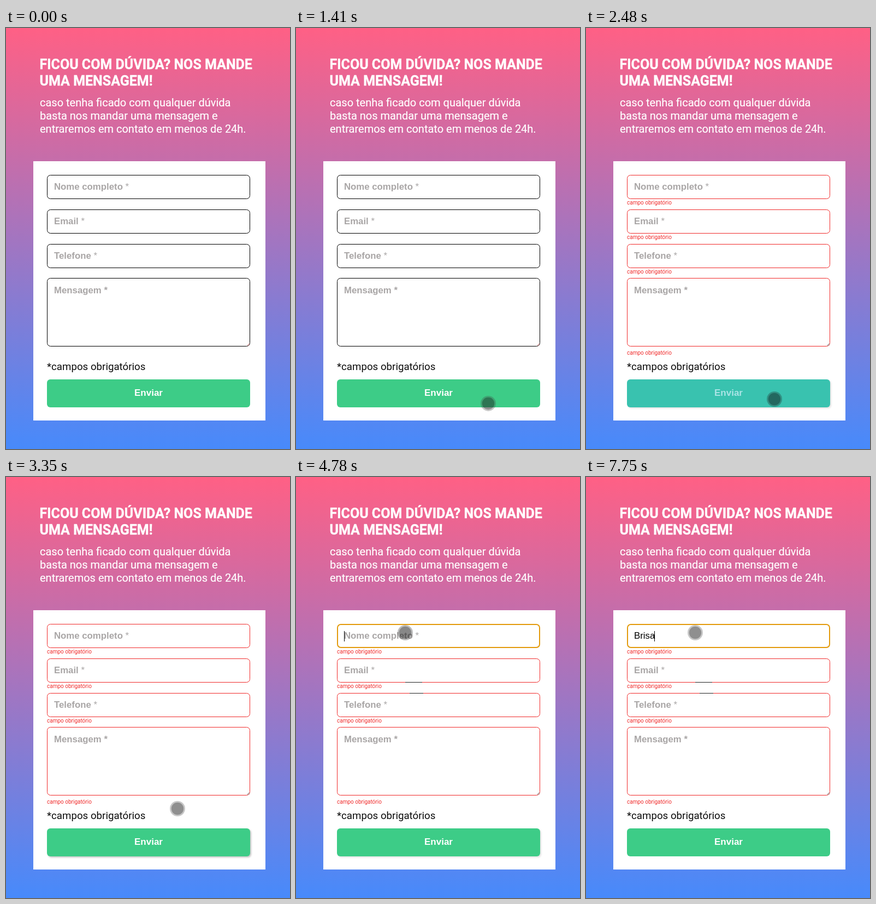
Recreate the animation shown at these times as an HTML page. Size 520 by 768 pixels, loop 8000 ms.

```html
<!DOCTYPE html>
<html lang="pt-BR">
<head>
<meta charset="utf-8">
<title>Formulário de contato</title>
<style>
  html, body { margin: 0; width: 100%; height: 100%; overflow: hidden; }
  svg { display: block; width: 520px; height: 768px; }
  text { white-space: pre; }
  .title { font: 700 25px Roboto, sans-serif; fill: #fff; stroke: #fff; stroke-width: .4; }
  .intro { font: 20px Roboto, sans-serif; fill: #fff; stroke: #fff; stroke-width: .2; }
  .note { font: 18.72px Roboto, sans-serif; fill: #0c0c0c; }
  .error { font: 10px Roboto, sans-serif; fill: #f02a2a; }
  .hint { font: 700 16.8px "Liberation Sans", Arial, sans-serif; fill: #a9a6a6; }
  .send { font: 700 17px "Liberation Sans", Arial, sans-serif; text-anchor: middle; }
  .typed { font: 16.8px "Liberation Sans", Arial, sans-serif; }
  .light { font-weight: 400; }
  .field { fill: none; stroke: #000; }
</style>
</head>
<body>
<svg viewBox="0 0 520 768">
  <defs>
    <linearGradient id="sky" x2="0" y2="1">
      <stop stop-color="#ff6085"/><stop offset="1" stop-color="#478afb"/>
    </linearGradient>
  </defs>
  <rect width="520" height="768" fill="url(#sky)"/>
  <text class="title" x="61.5" y="75">FICOU COM DÚVIDA? NOS MANDE</text>
  <text class="title" x="61.5" y="105">UMA MENSAGEM!</text>
  <text class="intro" x="62" y="143">caso tenha ficado com qualquer dúvida</text>
  <text class="intro" x="62" y="167">basta nos mandar uma mensagem e</text>
  <text class="intro" x="62" y="191">entraremos em contato em menos de 24h.</text>
  <rect x="50" y="243" width="425" height="473" fill="#fff"/>
  <g id="fields"></g>
  <path id="grip" d="M441.5 579.5l4-4M444 579.5l1.5-1.5" fill="none"/>
  <path id="marks" d="M200 374.5h31M208 394.5h25" stroke="#222"/>
  <text class="note" x="75" y="624">*campos obrigatórios</text>
  <rect id="button" x="75" y="641" width="372" height="51" rx="6"/>
  <text id="send" class="send" x="261" y="671">Enviar</text>
  <text id="typed" class="typed" x="88" y="295"></text>
  <rect id="caret" y="281" width="1" height="19"/>
  <g id="pointer">
    <circle id="ring" r="14"/>
    <circle r="11.2" fill="#000" fill-opacity=".28"/>
  </g>
  <path id="move" transform="translate(199 283)" stroke="#fff" stroke-width="1.6" paint-order="stroke"
    d="M0-9.5 4-5H1.3V-1.3H5V-4L9.5 0 5 4V1.3H1.3V5H4L0 9.5-4 5h2.7V1.3H-5V4L-9.5 0-5-4v2.7h3.7V-5H-4z"/>
</svg>
<script>
const $ = id => document.getElementById(id);
const LOOP = 8000, CLICK = 2410, FOCUS = 4780;
const NAME = 'Brisa', KEY_TIMES = [6300, 6500, 7160, 7490, 7750];
const CARET_X = [88, 98, 104, 108, 116, 125];

const fieldMarkup = ([label, star, top, height, textY, errorY]) => `
  <rect class="field" x="75.5" y="${top + .5}" width="371" height="${height - 1}" rx="6"/>
  <text class="hint" x="88" y="${textY}">${label} <tspan class="${star}">*</tspan></text>
  <text class="error" x="75" y="${errorY}">campo obrigatório</text>`;
$('fields').innerHTML = [
  ['Nome completo', 'light', 268, 44, 295, 322],
  ['Email', 'light', 331, 44, 358, 385],
  ['Telefone', 'light', 394, 44, 421, 448],
  ['Mensagem', '', 456, 125, 484, 596],
].map(fieldMarkup).join('');
const borders = [...document.querySelectorAll('.field')];
const errors = [...document.querySelectorAll('.error')];
const nameHint = document.querySelector('.hint');

const clamp = v => Math.max(0, Math.min(1, v));
const mix = (a, b, k) => a + (b - a) * k;
const mixColor = (a, b, k) => `rgb(${a.map((v, i) => Math.round(mix(v, b[i], k)))})`;
const within = (t, a, b) => t >= a && t < b;
const show = (node, on) => node.setAttribute('visibility', on ? 'visible' : 'hidden');
const set = (node, attrs) => Object.entries(attrs).forEach(([k, v]) => node.setAttribute(k, v));
// Progress from start to end in equal discrete steps.
const stepped = (t, start, end, steps) =>
  clamp(Math.floor((t - start) / (end - start) * steps + .1) / steps);

function pointerAt(t) {
  if (t < 3350) {
    const left = (1 - stepped(t, 860, 1610, 11)) ** 1.87;
    return [345 + 80 * left, 677 + 90 * left];
  }
  const left = 1 - stepped(t, 3350, 4100, 11);
  const settle = stepped(t, 4100, 4300, 3);
  return [202 + 112 * left ** 2.2 - 2 * settle, 304 + 301 * left ** 1.5 - 20 * settle];
}

function drawFields(t) {
  const focused = t >= FOCUS, failed = t >= CLICK;
  borders.forEach((border, i) => {
    const active = focused && i === 0;
    const inset = active ? 1 : .5;
    border.style.stroke = active ? '#e39a0c' : failed ? '#f02a2a' : '#000';
    border.style.strokeWidth = active ? 2 : 1;
    if (i === 0) set(border, { x: 75 + inset, y: 268 + inset, width: 372 - 2 * inset, height: 44 - 2 * inset });
  });
  errors.forEach(e => show(e, failed));
  set($('grip'), { stroke: failed ? '#666' : '#d77' });

  const count = KEY_TIMES.filter(k => t >= k).length;
  const lastInput = count ? KEY_TIMES[count - 1] : FOCUS;
  $('typed').textContent = NAME.slice(0, count);
  show(nameHint, count === 0);
  set($('caret'), { x: CARET_X[count] });
  show($('caret'), focused && (t - lastInput) % 1060 < 530);
}

function drawButton(t) {
  const flash = t < CLICK ? 0 : t < CLICK + 70 ? .5 : 1 - stepped(t, CLICK + 70, 2690, 3);
  const shadow = t < CLICK ? 0
    : mix(.3, 1, stepped(t, CLICK, 2690, 4)) * (1 - stepped(t, FOCUS - 70, FOCUS + 70, 2));
  set($('button'), { fill: mixColor([61, 204, 135], [57, 194, 175], flash) });
  $('button').style.filter = shadow > 0 ? `drop-shadow(2px 2px 1.5px rgba(0,0,0,${.23 * shadow}))` : 'none';
  $('send').style.fill = mixColor([255, 255, 255], [170, 228, 230], flash);
}

function drawPointer(t) {
  const dragging = within(t, 5840, 6170);
  const pressed = within(t, 2210, 2690) || within(t, 4580, 4850);
  set($('pointer'), { transform: `translate(${pointerAt(t)})` });
  set($('ring'), { fill: pressed ? '#222' : '#464646', 'fill-opacity': .3 });
  show($('pointer'), t >= 860 && !dragging);
  show($('move'), dragging);
  show($('marks'), t >= 3830);
}

function frame() {
  const t = performance.now() % LOOP;
  drawFields(t);
  drawButton(t);
  drawPointer(t);
  requestAnimationFrame(frame);
}
frame();
</script>
</body>
</html>
```
